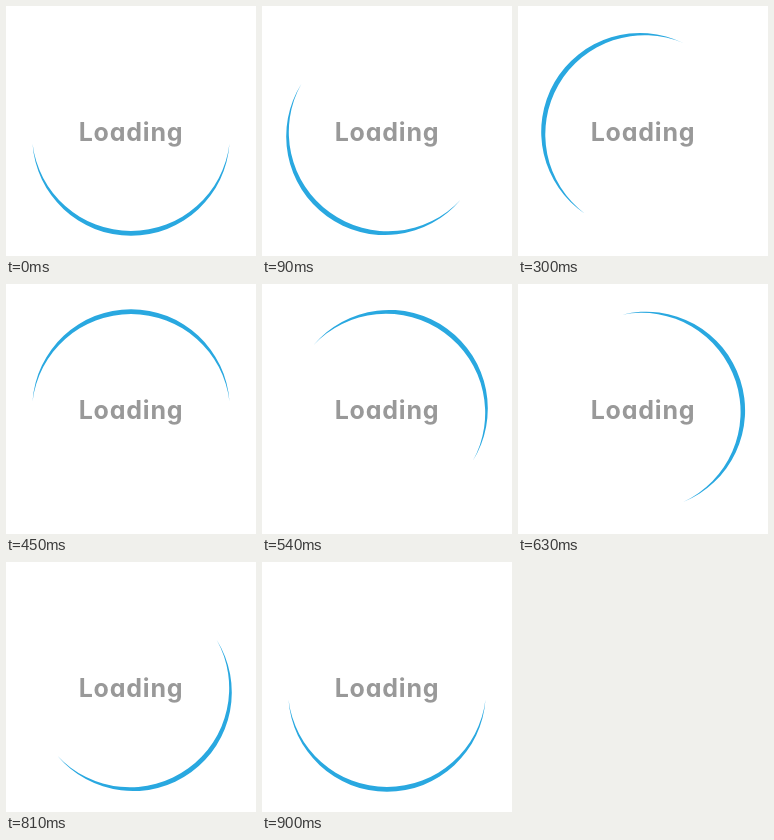
Animation of 250x250 px, one loop 0.93 s. Source, as an HTML page:

```html
<!DOCTYPE html>
<html lang="en">
<head>
<meta charset="utf-8">
<title>Loading</title>
<style>
  html, body { margin: 0; height: 100%; overflow: hidden; background: #fff; }
  svg { display: block; width: 100%; height: 100%; }
  text {
    font: 700 25px Inter, sans-serif;
    font-feature-settings: "cv11"; /* single-storey a */
    letter-spacing: 0.8px;
    fill: #999;
    text-anchor: middle;
  }
</style>
</head>
<body>
<svg viewBox="0 0 250 250">
  <!-- crescent: outer arc and slightly flatter inner arc -->
  <path id="crescent" fill="#29a8e0"
    d="M-98.47 10.3A98.7 98.7 0 0 0 98.47 10.3A99.2 99.2 0 0 1-98.47 10.3Z"/>
  <text x="125" y="135">Loading</text>
</svg>
<script>
  const STEP = 30, STEPS = 31, TURN = 12;
  const crescent = document.getElementById('crescent');

  function draw(now) {
    const step = Math.floor(now / STEP) % STEPS;
    crescent.setAttribute('transform', `translate(125 127.5) rotate(${step * TURN})`);
  }

  function tick() {
    draw(performance.now());
    requestAnimationFrame(tick);
  }
  tick();
</script>
</body>
</html>
```
